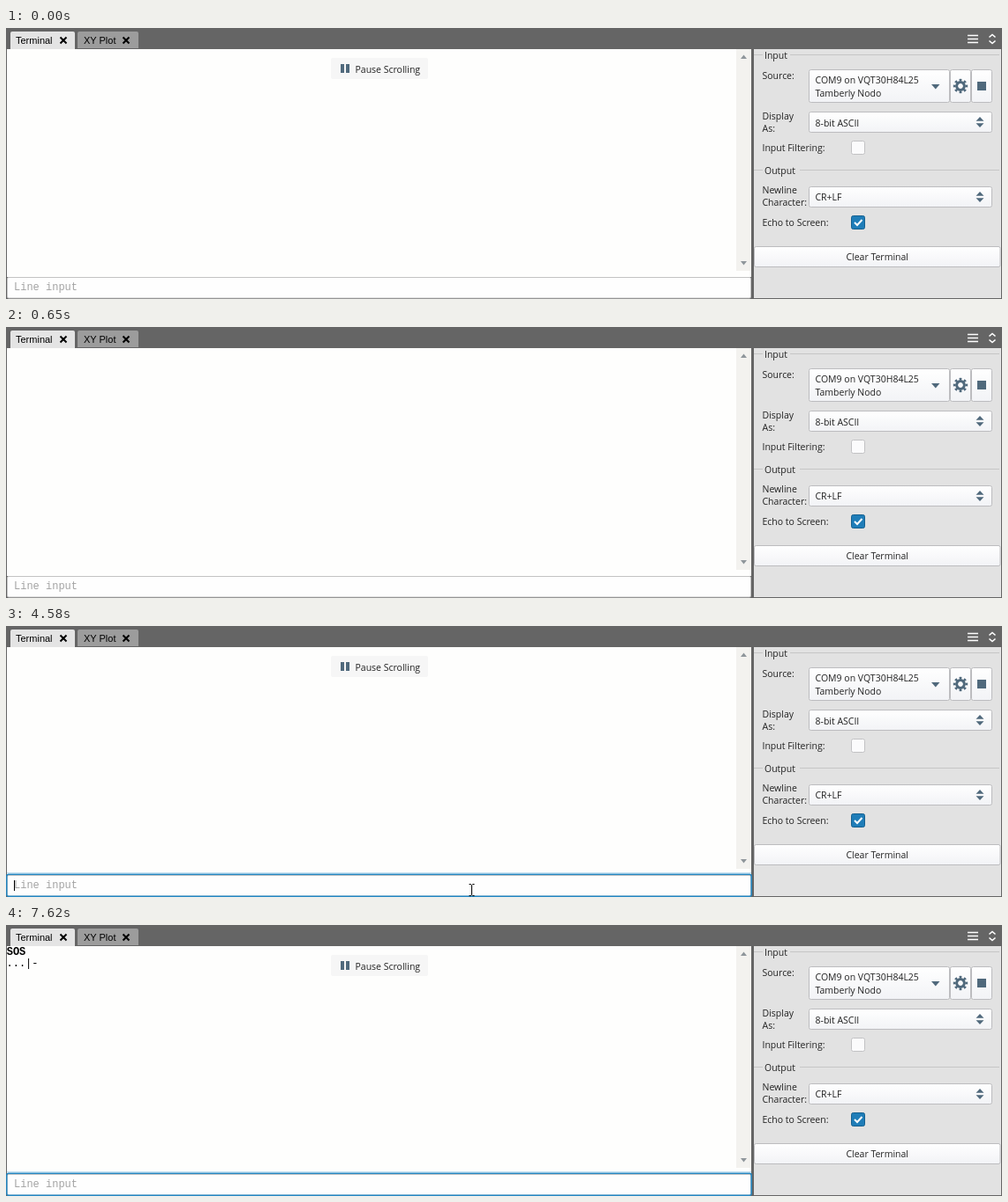
These frames come from a looping animation (1128x308 px, 8 s). An HTML page:

```html
<!DOCTYPE html>
<html lang="en">
<head>
<meta charset="utf-8">
<title>Serial terminal</title>
<style>
html, body { margin: 0; width: 100%; height: 100%; overflow: hidden; background: #656565; }
svg { display: block; }
text { font: 10.5px "Open Sans", "Noto Sans", sans-serif; fill: #222; white-space: pre; }
.tab { font: 11px "Liberation Sans", Arial, sans-serif; fill: #000; }
.mono { font: 12px "Liberation Mono", monospace; fill: #000; }
.bold { font-weight: bold; }
.icon { fill: #50697c; }
.box { fill: url(#shine); stroke: #bcbcbf; }
.rule { stroke: #c6c6c6; }
.line { fill: none; stroke: #fff; stroke-width: 1.6; }
</style>
</head>
<body>
<svg width="1128" height="308" viewBox="0 0 1128 308">
  <defs>
    <linearGradient id="shine" x2="0" y2="1">
      <stop stop-color="#fff"/><stop offset="1" stop-color="#f2f3f6"/>
    </linearGradient>
    <path id="close" d="M-3.5-3.5l7 7m0-7l-7 7" stroke="#000" stroke-width="2"/>
    <path id="spin" class="icon" d="M-4.5-1.2L0-6l4.5 4.8zM-4.5 1.2L0 6l4.5-4.8z"/>
  </defs>
  <rect width="1128" height="308" fill="#656565"/>

  <!-- Tabs and window icons -->
  <path d="M5 24V6q0-2 2-2h69q2 0 2 2v18z" fill="#e4e4e4"/>
  <path d="M81 23V6q0-2 2-2h65q2 0 2 2v17z" fill="#9c9c9c"/>
  <text class="tab" x="11" y="18">Terminal</text>
  <text class="tab" x="88" y="18">XY Plot</text>
  <use href="#close" x="65" y="14"/>
  <use href="#close" x="136" y="14"/>
  <path class="line" d="M1089 8.5h12m-12 4h12m-12 4h12"/>
  <path class="line" d="M1113.5 10.5l3.5-3 3.5 3m-7 4l3.5 3 3.5-3"/>

  <!-- Terminal -->
  <rect x="1" y="24" width="843" height="259" fill="#fefefd"/>
  <rect x="827" y="24" width="17" height="252" fill="#f3f2ef"/>
  <path d="M832 35l3.5-4.5L839 35zM832 265l3.5 4.5L839 265z" fill="#8f969b"/>
  <text class="mono bold" id="echo" x=".7" y="34">SOS</text>
  <text class="mono" id="morse" x=".5" y="47"></text>
  <g id="pause">
    <rect x="368" y="34" width="110" height="24" rx="2" fill="#f6f6f6"/>
    <path class="icon" d="M379 41h4v10h-4zM385 41h4v10h-4z"/>
    <text x="395.5" y="51">Pause Scrolling</text>
  </g>

  <!-- Line input -->
  <rect x="1.5" y="283.5" width="842" height="23.5" rx="1.5" fill="#fefefe" stroke="#c3c3c3"/>
  <g id="focus" fill="none">
    <path d="M1 280.5h843" stroke="#c3e0f1"/>
    <rect x=".8" y="282.3" width="843.4" height="25" rx="2" stroke="#2488c4" stroke-width="1.5"/>
  </g>
  <text class="mono" id="entry" x="9" y="298"></text>
  <rect id="caret" y="289" width="1" height="12"/>

  <!-- Settings -->
  <rect x="847" y="24" width="280" height="283" fill="#e2e2e2"/>
  <path class="rule" d="M847 30.5h10M888 30.5h237M847 161.5h10M899 161.5h226"/>
  <text x="859" y="35">Input</text>
  <text x="859" y="166">Output</text>
  <text x="856.5" y="58">Source:</text>
  <text x="856.5" y="104">Display</text>
  <text x="856.5" y="118">As:</text>
  <text x="856.5" y="140">Input Filtering:</text>
  <text x="856.5" y="188">Newline</text>
  <text x="856.5" y="202">Character:</text>
  <text x="856.5" y="225">Echo to Screen:</text>

  <rect class="box" x="909.5" y="47.5" width="159" height="37" rx="2"/>
  <rect class="box" x="1069.5" y="47.5" width="23" height="37" rx="2"/>
  <rect class="box" x="1093.5" y="47.5" width="23" height="37" rx="2"/>
  <rect class="box" x="909.5" y="95.5" width="207" height="23" rx="2"/>
  <rect class="box" x="909.5" y="180.5" width="207" height="23" rx="2"/>
  <rect class="box" x="847.5" y="248.5" width="278.5" height="23" rx="2"/>
  <text x="916.5" y="63">COM9 on VQT30H84L25</text>
  <text x="916.5" y="78">Tamberly Nodo</text>
  <text x="916.5" y="112">8-bit ASCII</text>
  <text x="916.5" y="196">CR+LF</text>
  <text x="986.7" y="264" text-anchor="middle">Clear Terminal</text>

  <path class="icon" d="M1048 64h9.5l-4.7 5.5z"/>
  <g transform="translate(1081 66)" fill="none" stroke="#50697c">
    <circle r="4.4" stroke-width="3"/>
    <circle r="6.8" stroke-width="2.8" pathLength="16" stroke-dasharray="1" stroke-dashoffset=".5"/>
  </g>
  <path class="icon" d="M1100 61h10v10h-10z"/>
  <use href="#spin" x="1103" y="107"/>
  <use href="#spin" x="1103" y="192"/>
  <rect x="957.5" y="128.5" width="15" height="15" rx="2" fill="#fbfbfc" stroke="#c2c2c4"/>
  <rect x="957.5" y="213.5" width="15" height="15" rx="2" fill="#1f7db8" stroke="#15608f"/>
  <path class="line" d="M961 221l3 3 5.5-6" style="stroke-width:2"/>

  <!-- Pointer -->
  <path id="arrow" d="M531 306.5v12l8-4z"/>
  <path id="beam" d="M-3-6.5h2l1 1 1-1h2M0-5.5v11M-3 6.5h2l1-1 1 1h2" fill="none" stroke="#000"/>
  <rect id="blank" width="1128" height="308" fill="#010103"/>
</svg>
<script>
const LOOP = 8000, CHAR = 7.2;
const $ = id => document.getElementById(id);
const show = (id, on) => $(id).style.display = on ? '' : 'none';
const ramp = (t, a, b) => Math.min(1, Math.max(0, (t - a) / (b - a)));
const ease = x => x * x * (3 - 2 * x);
const count = (t, times) => times.filter(at => t >= at).length;

const KEYS = [4790, 4900, 5000], ENTER = 5200, FOCUS = 3540;
const MORSE = [5440, 5920, 6400, 6890, 7510];
const BLINKS = [FOCUS, 4060, 4580, 5510, 6030, 6550, 7100, 7620];

function draw(t) {
  show('blank', t >= 620 && t < 650);
  $('pause').style.opacity = t < 620 ? 1 - ramp(t, 170, 480) : ramp(t, 3200, 3550);

  const focused = t >= FOCUS;
  const typed = t < ENTER ? 'SOS'.slice(0, count(t, KEYS)) : '';
  show('focus', focused);
  $('entry').textContent = typed || 'Line input';
  $('entry').style.fill = typed ? '#000' : '#a3a3a3';
  show('caret', count(t, BLINKS) % 2);
  $('caret').setAttribute('x', 9 + Math.round(CHAR * typed.length));

  show('echo', t >= ENTER);
  $('morse').textContent = '...|-'.slice(0, count(t, MORSE));

  // The pointer enters from below, rests in the field and leaves downwards.
  const enter = ease(ramp(t, 3170, 3740)), leave = ramp(t, 5890, 6250) ** 2;
  const x = 531.5 - 4 * enter + 9 * leave;
  const y = 307 - 7 * enter + 16 * leave;
  show('arrow', t >= 3170 && t < 3200);
  show('beam', t >= 3200 && t < 6250);
  $('beam').setAttribute('transform', `translate(${Math.round(x - .5) + .5} ${Math.round(y)})`);
}

const start = performance.now();
function tick() {
  draw((performance.now() - start) % LOOP);
  requestAnimationFrame(tick);
}
tick();
</script>
</body>
</html>
```
